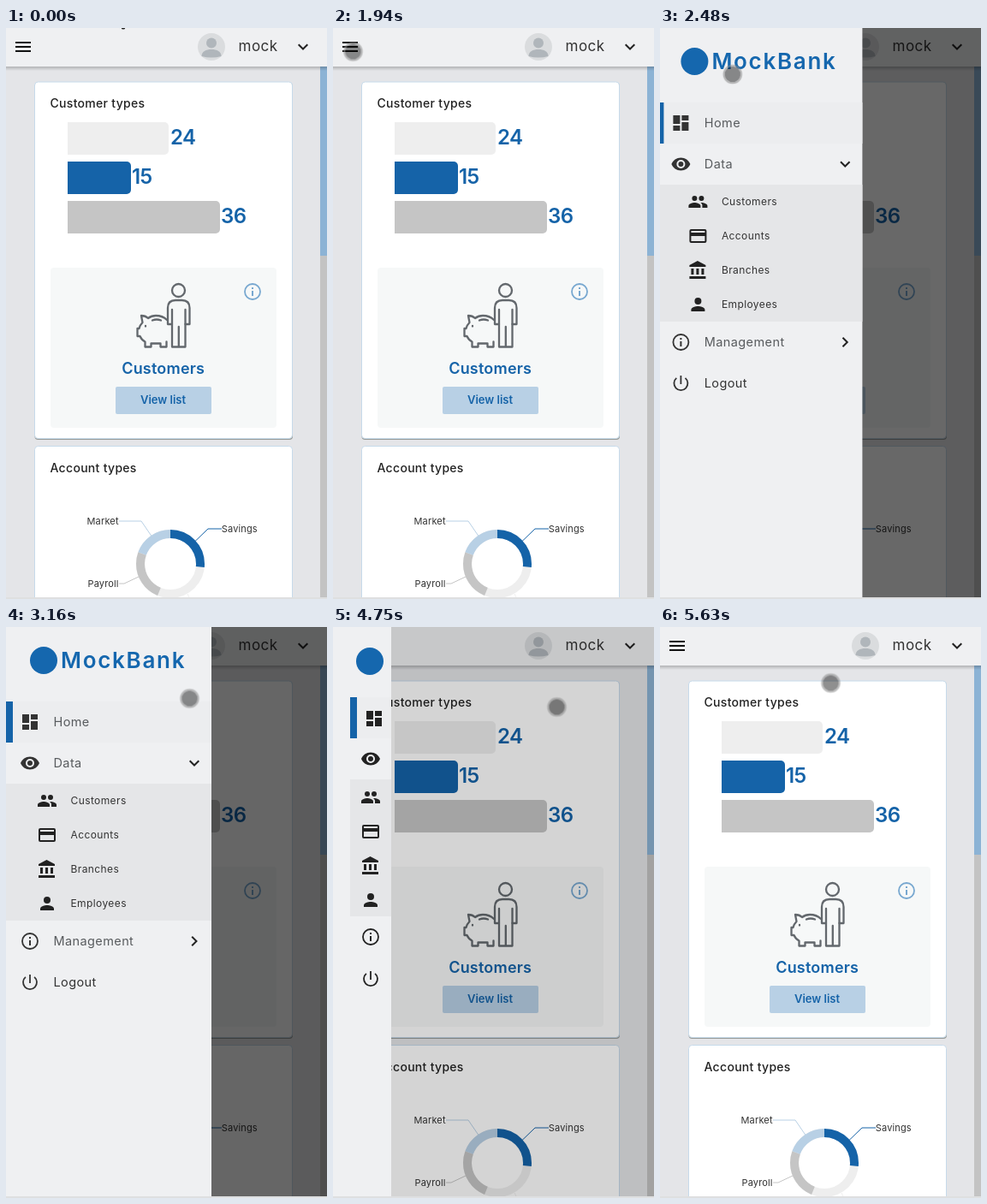
Recreate the animation shown at these times as an HTML page. Size 375 px wide and 667 px high, loop 6.37 s.

```html
<!DOCTYPE html>
<html lang="en">
<head>
<meta charset="utf-8">
<title>Bank dashboard menu</title>
<style>
@property --p { syntax: '<number>'; inherits: true; initial-value: 0; }
@property --m { syntax: '<number>'; inherits: true; initial-value: 0; }

html, body { margin: 0; width: 100%; height: 100%; overflow: hidden; background: #e4e5e8; }
svg { display: block; width: 375px; height: 667px; font-family: Inter, "Open Sans", sans-serif; }

.line { fill: none; stroke-width: 2; }
.title { font-size: 14px; font-weight: 500; letter-spacing: .3px; fill: #212121; }
.num { font-size: 24px; font-weight: 600; letter-spacing: -.6px; fill: #1563a8; }
.tag { font-size: 11px; letter-spacing: .15px; fill: #333; }
.nav { font-size: 14.5px; letter-spacing: .4px; fill: #585b5e; }
.sub { font-size: 12px; letter-spacing: .4px; fill: #333; }

/* --p: how far the drawer is open, --m: narrow layout on */
.stage { animation: drawer 6.37s step-end infinite; }
.panel { transform: translateX(calc((var(--p) - 1) * 240px)); }
.trail { transform: translateX(calc((var(--p) - 1) * 9px)); }
.shade { opacity: calc(var(--p) * .6); }
.full { opacity: calc(1 - var(--m)); }
.mini { opacity: var(--m); }
.dot { animation: dot 6.37s linear infinite; }
.speck { animation: speck 6.37s step-end infinite; }

@keyframes drawer {
  0% { --p: 0; --m: 0; }
  34.53% { --p: .03; --m: 0; }
  35.63% { --p: .57; --m: 0; }
  36.73% { --p: .85; --m: 0; }
  37.83% { --p: .95; --m: 0; }
  38.93% { --p: .985; --m: 0; }
  40.03% { --p: 1; --m: 0; }
  73.46% { --p: .675; --m: 1; }
  74.56% { --p: .2833; --m: 1; }
  75.66% { --p: .102; --m: 1; }
  76.76% { --p: .036; --m: 1; }
  77.86% { --p: .009; --m: 1; }
  78.96%, 100% { --p: 0; --m: 1; }
}
@keyframes dot {
  0% { transform: translate(130px, -14px); }
  2.98% { transform: translate(130px, -14px); animation-timing-function: steps(9, start); }
  12.33% { transform: translate(92.5px, 27.5px); }
  13.33% { transform: translate(92.5px, 27.5px); animation-timing-function: steps(6, start); }
  19.73% { transform: translate(68px, 32.7px); animation-timing-function: steps(2, start); }
  21.97% { transform: translate(62.5px, 34.5px); }
  23.39% { transform: translate(62.5px, 34.5px); animation-timing-function: steps(4, start); }
  28.1% { transform: translate(46px, 36.5px); animation-timing-function: steps(3, start); }
  31.63% { transform: translate(23.5px, 27.5px); }
  36.73% { transform: translate(23.5px, 27.5px); animation-timing-function: steps(7, start); }
  44.41% { transform: translate(166.5px, 89.5px); animation-timing-function: steps(6, start); }
  50.62% { transform: translate(214.5px, 83.5px); animation-timing-function: steps(4, start); }
  54.75% { transform: translate(229.5px, 73.5px); animation-timing-function: step-start; }
  55.88% { transform: translate(231px, 71.5px); }
  60.9% { transform: translate(231px, 71.5px); animation-timing-function: steps(6, start); }
  67.5% { transform: translate(261.5px, 93.5px); }
  75.66% { transform: translate(261.5px, 93.5px); animation-timing-function: steps(6, start); }
  82.33% { transform: translate(226.5px, 66px); }
  82.41% { transform: translate(226.5px, 66px); animation-timing-function: steps(6, start); }
  89.55%, 100% { transform: translate(199.5px, 65.5px); }
}
@keyframes speck {
  0% { opacity: 1; }
  2.98%, 100% { opacity: 0; }
}
</style>
</head>
<body>
<svg class="stage" viewBox="0 0 375 667">
  <defs>
    <linearGradient id="fade" x2="0" y2="1">
      <stop stop-color="#000" stop-opacity=".22"/>
      <stop offset="1" stop-color="#000" stop-opacity="0"/>
    </linearGradient>

    <!-- 24 x 24 icons -->
    <path id="home" d="M3 13h8V3H3zm0 8h8v-6H3zm10 0h8V11h-8zm0-18v6h8V3z"/>
    <path id="eye" fill-rule="evenodd" d="M12 4.5C7 4.5 2.7 7.6 1 12c1.7 4.4 6 7.5 11 7.5s9.3-3.1 11-7.5c-1.7-4.4-6-7.5-11-7.5zM12 17a5 5 0 1 1 0-10 5 5 0 0 1 0 10zm0-8a3 3 0 1 0 0 6 3 3 0 0 0 0-6z"/>
    <g id="people">
      <circle cx="8" cy="8" r="3"/><circle cx="16" cy="8" r="3"/>
      <path d="M8 13c-2.3 0-7 1.2-7 3.5V19h14v-2.5C15 14.2 10.3 13 8 13zm8 0l-1 .1c1.2.8 2 1.9 2 3.4V19h6v-2.5C23 14.2 18.3 13 16 13z"/>
    </g>
    <path id="card" fill-rule="evenodd" d="M20 4H4a2 2 0 0 0-2 2v12a2 2 0 0 0 2 2h16a2 2 0 0 0 2-2V6a2 2 0 0 0-2-2zm0 14H4v-6h16zm0-10H4V6h16z"/>
    <path id="branch" d="M4 10v7h3v-7zm6 0v7h3v-7zM2 22h19v-3H2zm14-12v7h3v-7zM11.5 1L2 6v2h19V6z"/>
    <g id="person">
      <circle cx="12" cy="8" r="4"/>
      <path d="M12 14c-2.7 0-8 1.3-8 4v2h16v-2c0-2.7-5.3-4-8-4z"/>
    </g>
    <g id="info">
      <circle cx="12" cy="12" r="9" fill="none" stroke="currentColor" stroke-width="1.8"/>
      <path d="M11 7h2v2h-2zm0 4h2v6h-2z" fill="currentColor"/>
    </g>
    <path id="power" d="M12 3v10M17.1 5.9a8 8 0 1 1-10.2 0" fill="none" stroke="currentColor" stroke-width="1.8"/>
    <path id="chevron" class="line" d="M6.7 9.2L12 14.5l5.3-5.3"/>
  </defs>

  <!-- page -->
  <rect width="375" height="667" fill="#e4e5e8"/>

  <rect x="33.5" y="64" width="301.5" height="417" rx="4" fill="#979b98"/>
  <rect x="33.5" y="63" width="301" height="416.5" rx="4" fill="#fff" stroke="#c6daea"/>
  <rect x="33.5" y="488.5" width="301" height="200" rx="4" fill="#fff" stroke="#c6daea"/>

  <text class="title" x="51.5" y="93">Customer types</text>
  <path d="M72 110h113a5 5 0 0 1 5 5v28a5 5 0 0 1-5 5H72z" fill="#eee"/>
  <path d="M72 156h69a5 5 0 0 1 5 5v28a5 5 0 0 1-5 5H72z" fill="#1563a8"/>
  <path d="M72 202h173a5 5 0 0 1 5 5v28a5 5 0 0 1-5 5H72z" fill="#c5c5c5"/>
  <text class="num" x="192" y="136">24</text>
  <text class="num" x="147" y="182">15</text>
  <text class="num" x="251" y="228">36</text>

  <rect x="52" y="280" width="264" height="187" rx="4" fill="#f6f8f8"/>
  <use href="#info" x="276" y="296" color="#78a8d0"/>
  <g fill="none" stroke="#63686d" stroke-width="2.3" stroke-linejoin="round" stroke-linecap="round">
    <circle cx="201.5" cy="306.500" r="7.500"/>
    <path d="M194 346h-5v-19q0-9 9-9h7.500q9 0 9 9v19h-5"/>
    <path d="M194 329v43.500h15.500v-43.500M201.800 349v23"/>
    <path d="M188 341q-5-5-13-5-5 0-9 3-3-3-8-3l1.500 8q-3 3-4 7h-2v9h3q2 4.500 6 6.500v6h7v-4h11v4h7v-6"/>
    <path d="M171 341.500q5-2 10 0M163 348v.5"/>
  </g>
  <text x="183.700" y="404" text-anchor="middle" font-size="18" font-weight="600" letter-spacing=".2" fill="#1563a8">Customers</text>
  <rect x="128" y="419" width="112" height="32" rx="2" fill="#b8d0e5"/>
  <text x="183.500" y="439" text-anchor="middle" font-size="13" font-weight="600" fill="#1563a8">View list</text>

  <text class="title" x="51.5" y="519">Account types</text>
  <!-- ring: pathLength makes the dashes degrees -->
  <g fill="none" stroke-width="10" transform="rotate(-90 192 626)">
    <circle cx="192" cy="626" r="35" stroke="#eee"/>
    <circle cx="192" cy="626" r="35" stroke="#1563a8" pathLength="360" stroke-dasharray="96 264"/>
    <circle cx="192" cy="626" r="35" stroke="#c5c5c5" pathLength="360" stroke-dasharray="88 272" stroke-dashoffset="-202"/>
    <circle cx="192" cy="626" r="35" stroke="#b8d0e5" pathLength="360" stroke-dasharray="70 290" stroke-dashoffset="-290"/>
  </g>
  <g fill="none">
    <path d="M132 576h26l12 17.500" stroke="#b8d0e5"/>
    <path d="M252 585h-16l-15 14.500" stroke="#1563a8"/>
    <path d="M132 649h6l17-8" stroke="#c5c5c5"/>
    <path d="M212 661l4 8" stroke="#eee"/>
  </g>
  <text class="tag" x="94.5" y="580">Market</text>
  <text class="tag" x="251.800" y="589">Savings</text>
  <text class="tag" x="95.5" y="653">Payroll</text>

  <rect x="367" y="45" width="8" height="622" fill="#c3c3c3"/>
  <rect x="367" y="45" width="8" height="221" fill="#8cb3d5"/>

  <rect y="45" width="375" height="5" fill="url(#fade)"/>
  <rect width="375" height="45" fill="#eff0f2"/>
  <path d="M11 16h18v2H11zm0 5h18v2H11zm0 5h18v2H11z" fill="#111"/>
  <circle cx="240" cy="22" r="16" fill="#dadcde"/>
  <circle cx="240" cy="17.500" r="6" fill="#b0b6bb"/>
  <path d="M228.500 33c0-5.500 5-8 11.500-8s11.500 2.500 11.500 8q-11.500 3-23 0z" fill="#b0b6bb"/>
  <text x="271.500" y="27" font-size="17" letter-spacing=".5" fill="#333">mock</text>
  <use href="#chevron" x="335" y="10" stroke="#222"/>

  <!-- drawer -->
  <rect class="shade" width="375" height="667"/>
  <g class="panel">
    <rect width="240" height="667" fill="#eff0f2"/>
    <g class="full">
      <circle cx="44" cy="39" r="16" fill="#1567ae"/>
      <text x="64" y="48" font-size="26" font-weight="600" letter-spacing="1.700" fill="#1567ae">MockBank</text>
      <rect y="87" width="240" height="48" fill="#ecedef"/>
      <rect y="87" width="8" height="48" fill="#1563a8"/>
      <rect y="183" width="240" height="160" fill="#e5e6e8"/>
      <g fill="#333" color="#333">
        <use href="#home" x="16" y="99"/>
        <use href="#eye" x="16" y="147"/>
        <use href="#info" x="16" y="355"/>
        <use href="#power" x="16" y="403"/>
      </g>
      <g fill="#222">
        <use href="#people" x="36" y="191"/>
        <use href="#card" x="36" y="231"/>
        <use href="#branch" x="36" y="271"/>
        <use href="#person" x="36" y="311"/>
      </g>
      <g class="nav trail">
        <text x="55.500" y="116">Home</text>
        <text x="55.500" y="164">Data</text>
        <text x="55.500" y="372">Management</text>
        <text x="55.500" y="420" fill="#333">Logout</text>
      </g>
      <g class="sub">
        <text x="75.500" y="207">Customers</text>
        <text x="75.500" y="247">Accounts</text>
        <text x="75.500" y="287">Branches</text>
        <text x="75.500" y="327">Employees</text>
      </g>
      <g class="trail" stroke="#222">
        <use href="#chevron" x="208" y="147"/>
        <use href="#chevron" transform="translate(208 379) rotate(-90)"/>
      </g>
    </g>
    <g class="mini">
      <circle cx="215" cy="40" r="16" fill="#1567ae"/>
      <rect x="192" y="82" width="48" height="48" fill="#ecedef"/>
      <rect x="192" y="82" width="8" height="48" fill="#1563a8"/>
      <rect x="192" y="178" width="48" height="160" fill="#e5e6e8"/>
      <g fill="#222" color="#222">
        <use href="#home" x="208" y="95"/>
        <use href="#eye" x="204" y="142"/>
        <use href="#people" x="204" y="187"/>
        <use href="#card" x="204" y="227"/>
        <use href="#branch" x="204" y="267"/>
        <use href="#person" x="204" y="307"/>
        <use href="#info" x="204" y="350"/>
        <use href="#power" x="204" y="399"/>
      </g>
    </g>
  </g>
  <rect y="665" width="375" height="2" fill="#dedfe0"/>

  <!-- touch pointer -->
  <ellipse class="speck" cx="137" cy="0" rx="2.200" ry="1.600" fill="#222"/>
  <g class="dot">
    <circle r="9.300" fill="#000" fill-opacity=".44"/>
    <circle class="line" r="10.300" stroke="#8a8a8a" stroke-opacity=".55"/>
  </g>
</svg>
</body>
</html>
```
